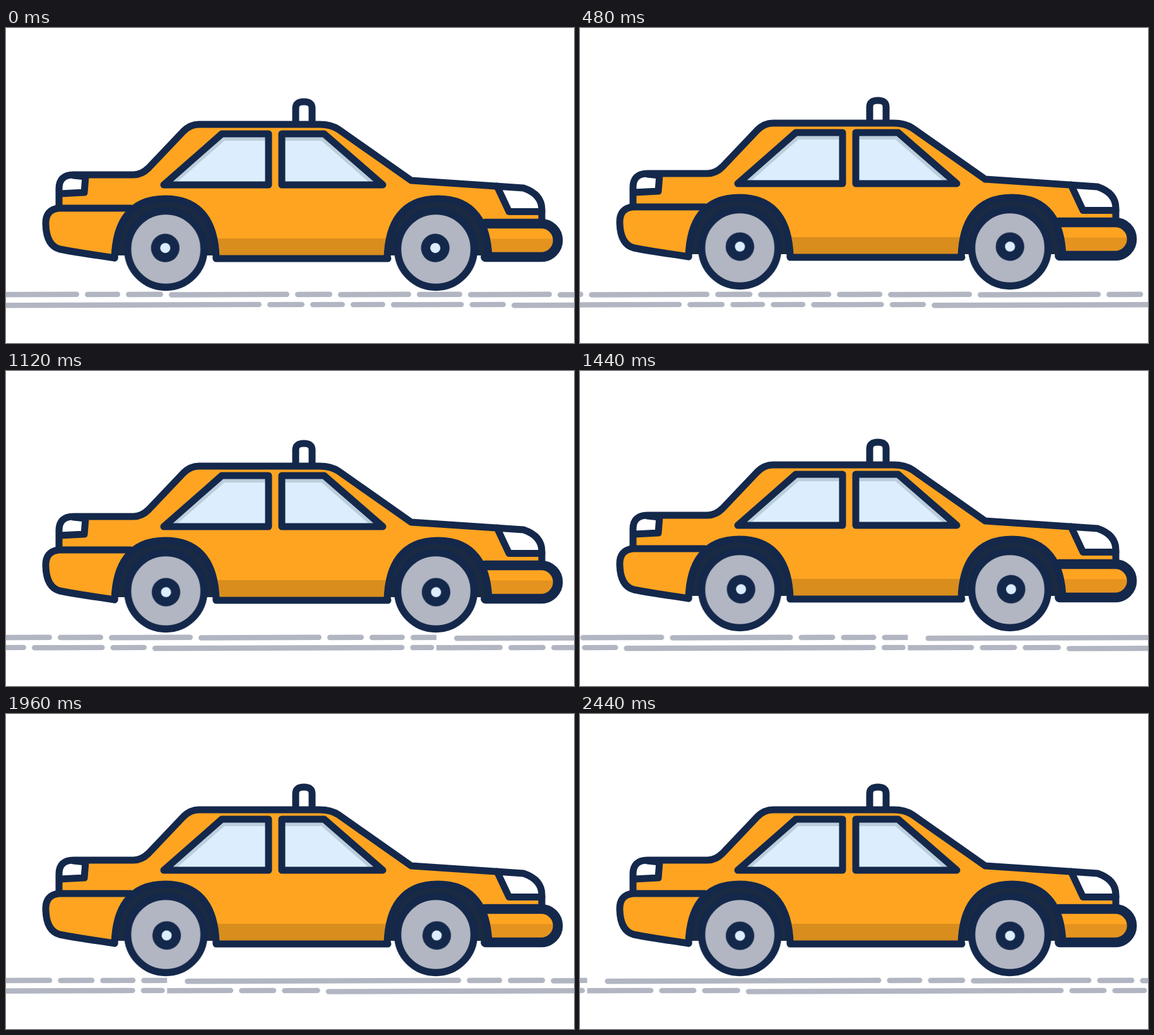
These frames come from a looping animation (900x500 px, 2480 ms). An HTML page:

```html
<!DOCTYPE html>
<html lang="en">
<head>
<meta charset="utf-8">
<title>Taxi</title>
<style>
  html, body { margin: 0; width: 100%; height: 100%; overflow: hidden; background: #fff; }
  svg { display: block; width: 900px; height: 500px; }
  .line { fill: none; stroke: #14284b; stroke-width: 11; stroke-linecap: round; stroke-linejoin: round; }
  .thick { stroke-width: 15.6; }
  .paint { fill: #ffa421; }
  .shade { fill: #d88d1d; }
  .white { fill: #fff; }
  .arch { fill: #192a42; }
  .glass { fill: #dceefd; }
  .tint { fill: #bccddb; }
  .navy { fill: #14284b; }
  .road { fill: none; stroke: #b2b6c2; stroke-width: 8.4; stroke-linecap: round; }
</style>
</head>
<body>
<svg viewBox="0 0 900 500">
  <defs>
    <clipPath id="tile"><rect x="-350" y="410" width="1601" height="40"/></clipPath>
    <g id="arch">
      <path class="arch" d="M-80.5 361C-79 310-57 271 0 271S79 310 80.5 361Z"/>
      <path class="line" d="M-80.5 365C-79 310-57 271 0 271S79 310 80.5 365"/>
    </g>
    <g id="wheel">
      <circle r="60.5" fill="#b2b6c2" stroke="#14284b" stroke-width="11.4"/>
      <g class="hub">
        <circle class="navy" cx="-.9" cy="-1.8" r="22.6"/>
        <circle class="glass" cx="-.9" cy="-1.8" r="8"/>
      </g>
    </g>
  </defs>

  <g id="road">
    <g id="strip" clip-path="url(#tile)"><path id="dashes" class="road"/></g>
    <use href="#strip" x="1601"/>
  </g>

  <g id="car">
    <path class="line" d="M459 148V127Q459 117 472 117T485 127V148"/>

    <path class="paint" d="M84 286V255Q84 233 107 233H202Q215 233 226 222L281 164Q292 153 306 153H497Q515 153 527 161L642 242L776 251L820 254Q849 264 849 288V310H758V360H172V286Z"/>
    <path class="shade" d="M330 334H608V362H330Z"/>

    <path class="tint" d="M250 249L342 168H416V249ZM437 168H504L597 249H437Z"/>
    <path class="glass" d="M266 249L346 179H416V249ZM437 179H500L580 249H437Z"/>
    <path class="line" d="M250 249L342 168H416V249ZM437 168H504L597 249H437Z"/>

    <path class="white" d="M84 264V255Q84 233 107 233L126 236L124 261Z"/>
    <path class="white" d="M778 251L820 254Q847 264 849 291H797Z"/>
    <path class="line" d="M84 284V255Q84 233 107 233H202Q215 233 226 222L281 164Q292 153 306 153H497Q515 153 527 161L642 242L776 251L820 254Q849 264 849 288V304"/>
    <path class="line" d="M107 234L126 236L124 261L86 263M778 251L797 291.5H849"/>

    <path class="paint" d="M758 310.5H848A26.5 26.5 0 0 1 848 363.5H758Z"/>
    <path fill="#e4931f" d="M758 334.5H874Q873 363 848 363H758Z"/>
    <path class="line thick" d="M759 310.5H848A26.5 26.5 0 0 1 848 363.5H760"/>

    <path class="paint" d="M200 286H84Q62 288 63 312Q64 345 85 351L172 364Z"/>
    <use href="#arch" x="252.5"/>
    <use href="#arch" x="684.5"/>
    <path class="line" d="M198 286H84Q62 288 63 312Q64 345 85 351Q110 356 172 365M333 366H605"/>
  </g>
</svg>
<script>
  const LOOP = 2480, STEP = 40, HALF_BOUNCE = 200, LIFT = 5, TURN = 440, TRAVEL = 1260;
  const GAP = 9, CAP = 4.2;
  const byId = id => document.getElementById(id);
  const car = byId('car');

  // A row of dashes from their spacings; each one rises slightly.
  function row(x, y, pitches) {
    return pitches.map(pitch => {
      const len = pitch - GAP, left = x + CAP, right = x + len - CAP;
      x += pitch;
      return `M${left} ${y + len / 300}L${right} ${y}`;
    }).join('');
  }
  byId('dashes').setAttribute('d',
    row(-322, 422.8, [447, 65, 68, 200, 68, 125, 81, 142, 204, 67, 65, 70]) +
    row(-370, 438.9, [134, 68, 69.5, 512.5, 68, 64, 64, 124.5, 66.5, 408.5, 47]));

  const easing = `steps(${LOOP / STEP}, end)`;
  const play = (el, frames) => el.animate(frames, { duration: LOOP, iterations: Infinity });
  const run = (el, from, to) => play(el, [{ transform: from, easing }, { transform: to }]);

  run(byId('road'), 'translateX(0px)', `translateX(${-TRAVEL}px)`);

  for (const x of [253.2, 681.1]) {
    const wheel = byId('wheel').cloneNode(true);
    wheel.removeAttribute('id');
    wheel.setAttribute('transform', `translate(${x} 351)`);
    car.append(wheel);
    run(wheel.querySelector('.hub'), 'rotate(0deg)', `rotate(${360 * LOOP / TURN}deg)`);
  }

  // Linear up and down, cut short by the loop.
  const bounce = [];
  const lift = t => {
    const phase = t / HALF_BOUNCE % 2;
    return `translateY(${-LIFT * Math.min(phase, 2 - phase)}px)`;
  };
  for (let t = 0; t < LOOP; t += HALF_BOUNCE) {
    const steps = Math.min(HALF_BOUNCE, LOOP - t) / STEP;
    bounce.push({ offset: t / LOOP, transform: lift(t), easing: `steps(${steps}, end)` });
  }
  bounce.push({ offset: 1, transform: lift(LOOP) });
  play(car, bounce);
</script>
</body>
</html>
```
